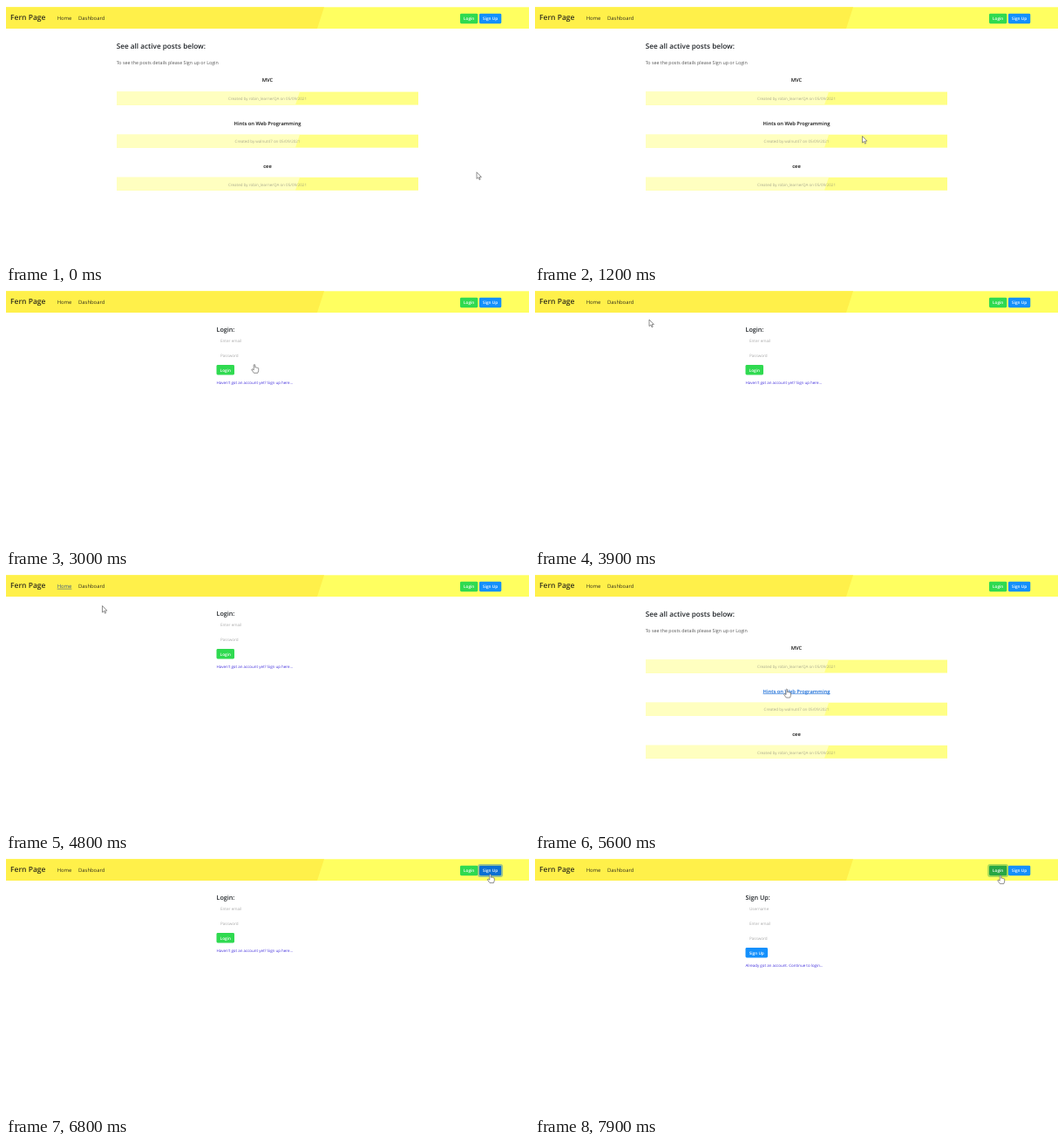
Animation of 600x294 px, one loop 8000 ms. Source, as an HTML page:

```html
<!DOCTYPE html>
<html lang="en">
<head>
<meta charset="utf-8">
<title>Blog walkthrough</title>
<style>
  html, body { margin: 0; width: 100%; height: 100%; overflow: hidden; background: #fff; }
  svg { display: block; width: 100%; height: 100%; }
  text { font-family: "Open Sans", "Noto Sans", sans-serif; text-rendering: geometricPrecision; fill: #212529; }
  .brand { font-size: 8.5px; font-weight: 600; fill: #33301c; }
  .nav { font-size: 5.9px; fill: #33301c; }
  .h1 { font-size: 8.2px; font-weight: 600; }
  .h2 { font-size: 7.2px; font-weight: 600; }
  .lead { font-size: 5.35px; fill: #555; }
  .post { font-size: 5.8px; font-weight: 600; fill: #111; text-anchor: middle; }
  .meta { font-size: 4.5px; fill: #77776f; fill-opacity: .62; text-anchor: middle; }
  .hint { font-size: 4.6px; fill: #aaa; }
  .more { font-size: 4.47px; fill: #4330dc; }
  .btn text { font-size: 4.7px; font-weight: 600; fill: #fff; text-anchor: middle; }
  .btn .ring { fill: none; stroke-width: 1.8; stroke-opacity: .4; visibility: hidden; }
  .green rect { fill: #2fda50; } .green .ring { stroke: #28a745; }
  .blue rect { fill: #1490fc; } .blue .ring { stroke: #0a6cd0; }
  .green.hover rect { fill: #27a744; }
  .blue.hover rect { fill: #0b6fd3; }
  .btn.focus .ring { visibility: visible; }
  .btn .ring, .btn.hover .ring { fill: none; }
  .post.hover { fill: #1268d6; text-decoration: underline; }
  .nav.hover { fill: #3b5a84; text-decoration: underline; }
  .cursor { fill: #fff; stroke: #555; stroke-width: .65; stroke-linejoin: round; }
</style>
</head>
<body>
<svg id="stage" viewBox="0 0 600 294"></svg>
<script>
const LOOP = 8000, STEP = 100;

const text = (cls, x, y, label, id = '') =>
  `<text class="${cls}" x="${x}" y="${y}" ${id && `id="${id}"`}>${label}</text>`;

const button = (color, x, y, w, label, id = '') =>
  `<g class="btn ${color}" ${id && `id="${id}"`}>
    <rect class="ring" x="${x - .9}" y="${y - .9}" width="${w + 1.8}" height="13.3" rx="2"/>
    <rect x="${x}" y="${y}" width="${w}" height="11.5" rx="1.4"/>
    ${text('', x + w / 2, y + 7.5, label)}
  </g>`;

// A two-tone panel split by a slanted edge.
const panel = (x, y, w, h, topX, bottomX, left, right) =>
  `<rect x="${x}" y="${y}" width="${w}" height="${h}" fill="${right}"/>
   <path d="M${x} ${y}H${topX}L${bottomX} ${y + h}H${x}Z" fill="${left}"/>`;

const posts = [
  ['MVC', 'robin_learnerQA'],
  ['Hints on Web Programming', 'walnut47'],
  ['cee', 'robin_learnerQA']
];

const postRow = ([title, author], i) => {
  const y = i * 49.1;
  return text('post', 300, 87.4 + y, title, `post${i}`) +
    panel(127, 98.6 + y, 346, 15, 337, 332, '#ffffc0', '#ffff86') +
    text('meta', 300, 108.3 + y, `Created by ${author} on 05/09/2021`);
};

const form = (title, hints, color, width, label, more) => {
  const y = 51.8 + hints.length * 17;
  return text('h2', 241.5, 48.4, title) +
    hints.map((hint, i) => text('hint', 246, 60.2 + i * 17, hint)).join('') +
    button(color, 241.5, y + .2, width, label) +
    text('more', 241.5, y + 22.3, more);
};

document.getElementById('stage').innerHTML = `
  <rect width="600" height="294" fill="#fff"/>
  ${panel(0, 1.3, 600, 24.7, 365, 357, '#fff04a', '#ffff60')}
  ${text('brand', 5, 15.9, 'Fern Page')}
  ${text('nav', 58.7, 15.8, 'Home', 'navHome')}
  ${text('nav', 83, 15.8, 'Dashboard')}
  ${button('green', 521, 8.7, 20.3, 'Login', 'navLogin')}
  ${button('blue', 543, 8.7, 25.3, 'Sign Up', 'navSignup')}
  <g id="home">
    ${text('h1', 126.7, 49.4, 'See all active posts below:')}
    ${text('lead', 126.7, 67.4, 'To see the posts details please Sign up or Login')}
    ${posts.map(postRow).join('')}
  </g>
  <g id="login">${form('Login:', ['Enter email', 'Password'], 'green', 20.5, 'Login',
    "Haven't got an account yet? Sign up here...")}</g>
  <g id="signup">${form('Sign Up:', ['Username', 'Enter email', 'Password'], 'blue', 25.5, 'Sign Up',
    'Already got an account. Continue to login...')}</g>
  <g id="pointer" class="cursor">
    <path id="arrow" d="M0 0V7.6L1.8 6L3 8.7L4.2 8.2L3 5.6H5.4Z"/>
    <path id="hand" d="M-.8 .7Q0 -.5 .8 .7V3.7Q1.6 3 2.3 3.9Q3.1 3.3 3.7 4.2Q4.7 4 4.7 5V7.4L3.8 10H-.6L-3.2 6.4Q-3 5 -1.8 5.8L-.8 6.6Z"/>
  </g>`;

const pages = [[0, 'home'], [3000, 'login'], [4900, 'home'], [5700, 'login'], [6900, 'signup']];

const shapes = [[0, 'arrow'], [1400, 'hand'], [3400, 'arrow'], [4300, 'hand'], [4700, 'arrow'],
  [5300, 'hand'], [5900, 'arrow'], [6500, 'hand']];

// time, x, y of the pointer tip
const path = [
  [0, 540, 190.8], [600, 540, 190.8], [1100, 400, 156], [1500, 302, 130], [1800, 285, 85.3],
  [3300, 285, 85.3], [3700, 190, 55], [4100, 72, 13], [4200, 72, 13], [4300, 73, 16],
  [4500, 73, 16], [4800, 110.5, 36.5], [5100, 225, 102], [5300, 285, 130], [5400, 288.8, 132],
  [5800, 288.8, 132], [6200, 450, 72], [6500, 554, 19.5], [6600, 555.6, 18.6],
  [7200, 555.6, 18.6], [7400, 534, 19.6], [LOOP, 534, 19.6]
];

// element, class, start, end
const states = [
  ['post1', 'hover', 1400, 1700], ['post0', 'hover', 1700, 3000],
  ['navHome', 'hover', 4500, 4900], ['post1', 'hover', 5300, 5700],
  ['navSignup', 'hover', 6500, 7300], ['navSignup', 'focus', 6700, 6900],
  ['navLogin', 'hover', 7400, LOOP], ['navLogin', 'focus', 7800, LOOP]
];

const byId = id => document.getElementById(id);
const current = (table, t) => table.filter(([start]) => start <= t).pop()[1];
const showOnly = (ids, active) =>
  ids.forEach(id => byId(id).style.display = id === active ? '' : 'none');

function pointerAt(t) {
  const i = path.findIndex(([time]) => time > t);
  const [t0, x0, y0] = path[i - 1], [t1, x1, y1] = path[i];
  const p = (t - t0) / (t1 - t0);
  return [x0 + (x1 - x0) * p, y0 + (y1 - y0) * p];
}

function render(t) {
  showOnly(['home', 'login', 'signup'], current(pages, t));
  showOnly(['arrow', 'hand'], current(shapes, t));
  byId('pointer').setAttribute('transform', `translate(${pointerAt(t)})`);
  const active = new Set(states.filter(([, , a, b]) => t >= a && t < b).map(([id, cls]) => id + cls));
  states.forEach(([id, cls]) => byId(id).classList.toggle(cls, active.has(id + cls)));
}

const origin = performance.now();
function tick(now) {
  const t = Math.max(0, now - origin) % LOOP;
  render(Math.floor(t / STEP) * STEP);
  requestAnimationFrame(tick);
}
render(0);
requestAnimationFrame(tick);
</script>
</body>
</html>
```
